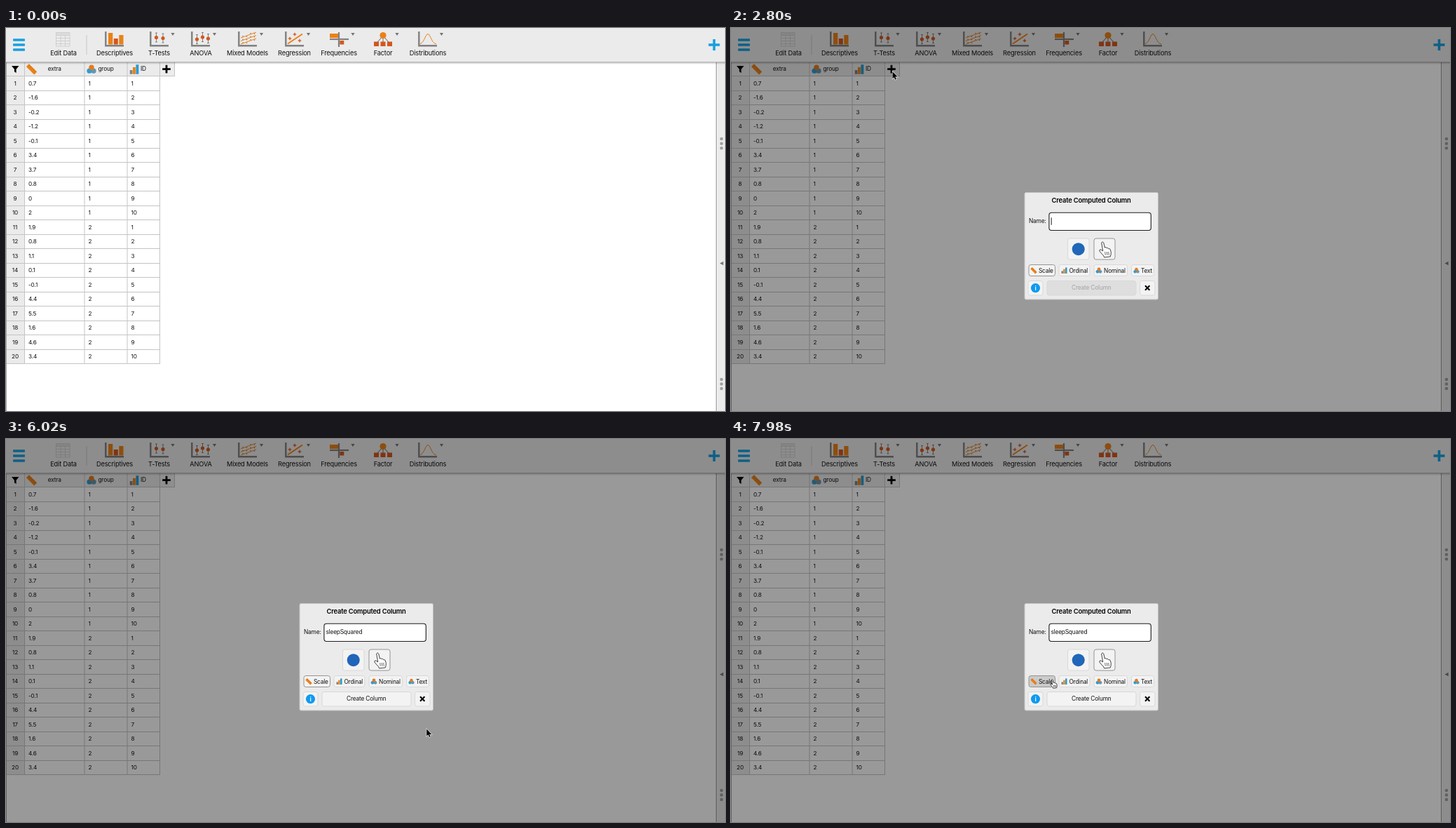
Write an HTML page with a canvas that moves like this. It is 1026 by 546 pixels and loops after 8000 ms.

```html
<!DOCTYPE html>
<html lang="en">
<head>
<meta charset="utf-8">
<title>Create a computed column</title>
<style>
html, body { margin: 0; width: 100%; height: 100%; overflow: hidden; background: #fff; }
canvas { display: block; width: 1026px; height: 546px; }
</style>
</head>
<body>
<canvas id="stage" width="1026" height="546"></canvas>
<script>
const ctx = document.getElementById('stage').getContext('2d');
const LOOP = 8000, STEP = 70;
const ORANGE = '#ea8117', RUST = '#d4561c', BLUE = '#18a0e0', GRAY = '#808080', PANEL = '#ebebeb';

const extra = '0.7 -1.6 -0.2 -1.2 -0.1 3.4 3.7 0.8 0 2 1.9 0.8 1.1 0.1 -0.1 4.4 5.5 1.6 4.6 3.4'.split(' ');

// Pointer path: time, x, y
const path = [
  [1470, 285, 336], [1540, 240, 225], [1610, 203, 130], [1680, 187, 91], [1820, 187, 91],
  [1890, 194.5, 90], [2100, 208, 84], [2380, 230.5, 62.2], [5530, 230.5, 62.2],
  [5810, 615, 436], [5950, 615, 436], [6230, 556, 346], [6300, 556, 346],
  [6510, 505, 319], [6580, 503.5, 316.5], [7140, 499, 313], [7350, 534, 317],
  [7560, 511, 344], [7770, 468, 350], [7980, 459, 342.5]
];

// Time at which each letter of the name is typed
const word = 'sleepSquared';
const keyTimes = [3080, 3780, 3920, 4060, 4200, 4550, 4760, 4970, 5040, 5110, 5250, 5390];

const buttons = {
  code: [480.5, 300, 30.5, 30], drag: [518, 300, 30, 30],
  scale: [425, 337.5, 37.5, 16], ordinal: [468, 337.5, 44, 16],
  nominal: [518, 337.5, 47.5, 16], text: [571.5, 337.5, 32, 16],
  info: [424, 360.5, 21, 20.5], create: [451, 360.5, 127, 20.5], close: [583.5, 360.5, 21.5, 20.5]
};

function rect(x, y, w, h, color) {
  ctx.fillStyle = color;
  ctx.fillRect(x, y, w, h);
}

function line(color, width, ...pts) {
  ctx.strokeStyle = color;
  ctx.lineWidth = width;
  ctx.beginPath();
  for (let i = 0; i < pts.length; i += 2) ctx.lineTo(pts[i], pts[i + 1]);
  ctx.stroke();
}

function shape(color, ...pts) {
  ctx.fillStyle = color;
  ctx.beginPath();
  for (let i = 0; i < pts.length; i += 2) ctx.lineTo(pts[i], pts[i + 1]);
  ctx.fill();
}

function dot(x, y, r, color) {
  ctx.fillStyle = color;
  ctx.beginPath();
  ctx.arc(x, y, r, 0, 7);
  ctx.fill();
}

function box(x, y, w, h, r, fill, stroke, width = 1) {
  ctx.beginPath();
  ctx.roundRect(x, y, w, h, r);
  ctx.fillStyle = fill;
  ctx.fill();
  ctx.strokeStyle = stroke;
  ctx.lineWidth = width;
  ctx.stroke();
}

function setFont(size, weight = 400) {
  ctx.font = `${weight} ${size}px Inter, Roboto, sans-serif`;
  ctx.letterSpacing = (-0.02 * size) + 'px';
}

function label(str, x, y, { size = 8.3, align = 'center', color = '#111', weight = 400 } = {}) {
  setFont(size, weight);
  ctx.textAlign = align;
  ctx.textBaseline = 'alphabetic';
  ctx.fillStyle = color;
  ctx.fillText(str, x, y + size * 0.36);
}

function plus(x, y, arm, width, color) {
  line(color, width, x - arm, y, x + arm, y);
  line(color, width, x, y - arm, x, y + arm);
}

const axes = x => line(GRAY, 2.4, x + 1.3, 5, x + 1.3, 25.3, x + 27, 25.3);

function errorBar(x, y) {
  line('#777', 0.9, x, y - 6.5, x, y + 6.5);
  line('#777', 0.9, x - 1.5, y - 6.5, x + 1.5, y - 6.5);
  line('#777', 0.9, x - 1.5, y + 6.5, x + 1.5, y + 6.5);
  dot(x, y, 2.6, RUST);
}

function scaleIcon(x, y, s) {
  ctx.save();
  ctx.translate(x, y);
  ctx.rotate(Math.PI / 4);
  ctx.scale(s, s);
  rect(-8, -2.8, 16, 5.6, ORANGE);
  for (let i = -6; i <= 6; i += 3) line('#b8651a', 0.7, i, -2.8, i, -0.6);
  ctx.restore();
}

function ordinalIcon(x, y, s) {
  rect(x - 6 * s, y + s, 3.6 * s, 5.5 * s, GRAY);
  rect(x - 1.9 * s, y - 3 * s, 3.7 * s, 9.5 * s, ORANGE);
  rect(x + 2.3 * s, y - 6.5 * s, 3.8 * s, 13 * s, '#2a9bd2');
}

function nominalIcon(x, y, s) {
  dot(x - 3 * s, y + 2.5 * s, 3.6 * s, '#2f9bcf');
  dot(x + 3 * s, y + 2.5 * s, 3.6 * s, '#6297b2');
  dot(x, y - 2.5 * s, 3.7 * s, '#e47b22');
}

function toolbarIcons() {
  for (const y of [17, 24, 31]) {
    ctx.beginPath();
    ctx.roundRect(10, y - 1.7, 17, 3.4, 1);
    ctx.fillStyle = BLUE;
    ctx.fill();
  }
  plus(1010.5, 24, 8, 3.6, BLUE);

  ctx.strokeStyle = '#cfcfcf';
  ctx.lineWidth = 1;
  ctx.strokeRect(71.5, 6.5, 19.5, 19.5);
  rect(72, 7, 19, 3, '#dcdcdc');
  for (let y = 10.5; y < 26; y += 4) line('#cfcfcf', 1, 71, y, 91, y);
  for (const x of [78, 84.5]) line('#cfcfcf', 1, x, 10, x, 26);
  line('#c6c6c6', 1, 115, 10, 115, 38);

  axes(141);
  rect(146, 7, 6.3, 16.5, ORANGE);
  rect(153.8, 15, 6, 8.5, RUST);
  rect(161.3, 10, 6.2, 13.5, ORANGE);

  axes(205);
  errorBar(214.5, 13.5);
  errorBar(224, 14.5);

  axes(264);
  errorBar(272.5, 16);
  errorBar(280.5, 13);
  errorBar(288.5, 15);

  axes(331);
  for (let i = 0; i < 3; i++) {
    const y = 14 + i * 4.5;
    line(ORANGE, 1, 335, y, 357, y - 8);
    for (let k = 0; k < 4; k++) dot(338 + k * 5.5, y - 1 - k * 2 + (k % 2 ? 1.2 : -1.2), 0.8, '#b06a38');
  }

  axes(398);
  line(ORANGE, 2, 402, 22.5, 423, 8.5);
  plus(405, 15, 2.3, 1.3, RUST);
  plus(412, 9, 2.3, 1.3, RUST);
  plus(419, 18, 2.3, 1.3, RUST);

  line(GRAY, 2.2, 475, 6, 475, 27);
  line(GRAY, 2.2, 462, 16, 489, 16);
  rect(462, 8, 12, 6, ORANGE);
  rect(476.3, 18, 6, 5.5, RUST);

  for (const x of [528.5, 538, 547.5]) {
    line('#777', 1.1, 538, 11, x, 22);
    rect(x - 3.5, 19.5, 7, 6.5, RUST);
  }
  dot(538, 10.5, 4.6, ORANGE);

  axes(588);
  ctx.strokeStyle = ORANGE;
  ctx.lineWidth = 1;
  ctx.beginPath();
  for (let x = 591; x <= 614; x++) ctx.lineTo(x, 23 - 14.5 * Math.exp(-(((x - 602) / 6) ** 2)));
  ctx.stroke();

  for (const x of [238, 297.5, 364.5, 431.5, 495, 558, 621.5]) shape('#737373', x - 2.6, 7, x + 2.6, 7, x, 11);

  const names = [['Edit Data', 82], ['Descriptives', 155], ['T-Tests', 218.5], ['ANOVA', 278],
    ['Mixed Models', 344.5], ['Regression', 411.5], ['Frequencies', 475], ['Factor', 538], ['Distributions', 602]];
  for (const [name, x] of names) label(name, x, 35.8, { size: 9.25 });
}

function table(pressed) {
  const grid = '#c4c4c4';
  rect(0, 49, 240.5, 20, PANEL);
  rect(0, 69, 27, 410, PANEL);
  rect(220, 49, 20.5, 20, pressed ? '#c9c9c9' : '#ededed');
  for (let i = 0; i <= 20; i++) {
    const y = 68.5 + Math.round(i * 20.5);
    line(grid, 1, 0, y, i ? 219.5 : 240.5, y);
  }
  for (const x of [26.5, 112, 173, 219.5]) line(grid, 1, x, 49, x, 479);
  line(grid, 1, 240.5, 49, 240.5, 69);
  line('#a8a8a8', 1, 0.5, 49, 0.5, 546);

  shape('#000', 8, 54, 18.5, 54, 14.6, 58.8, 14.6, 64, 11.9, 62.3, 11.9, 58.8);
  scaleIcon(36.5, 58.8, 1);
  nominalIcon(122, 58.7, 1);
  ordinalIcon(183, 59, 1.04);
  label('extra', 69.3, 58.5);
  label('group', 142.5, 58.5);
  label('ID', 196, 58.5);
  plus(229, 58.6, 5.8, 2.8, '#000');

  extra.forEach((value, i) => {
    const y = 79 + i * 20.5, size = 8.2;
    label(i + 1, 13, y, { size });
    label(value, 32, y, { size, align: 'left' });
    label(i < 10 ? 1 : 2, 117.5, y, { size, align: 'left' });
    label(i % 10 + 1, 178.5, y, { size, align: 'left' });
  });
}

function windowBase(pressed) {
  rect(0, 0, 1026, 546, '#fff');
  table(pressed);
  rect(1014, 49, 12, 497, PANEL);
  line('#9b9b9b', 1, 1013.5, 49, 1013.5, 546);
  for (const y of [158, 164.7, 171.3, 501, 507.5, 514]) dot(1021, y, 2.3, '#a0a0a0');
  shape('#777', 1018.5, 335.5, 1023.7, 332.7, 1023.7, 338.3);
  rect(0, 0, 1026, 48, PANEL);
  const shadow = ctx.createLinearGradient(0, 48, 0, 52);
  shadow.addColorStop(0, 'rgba(0,0,0,.32)');
  shadow.addColorStop(1, 'rgba(0,0,0,0)');
  rect(0, 48, 1026, 4, shadow);
  toolbarIcons();
}

function hand(x, y, s, fill, width) {
  ctx.save();
  ctx.translate(x, y);
  ctx.scale(s, s);
  const outline = new Path2D('M3.2 1.6Q4.6-1 6.2 1.5L7.8 8.6Q9.6 7.2 10.6 9.2Q12.4 8.2 13.2 10.2' +
    'Q15.4 9.6 15.8 11.6L16.8 15Q17 18 15.8 21.4L7.2 22.4Q6.2 19.4 3.6 17.4L.4 13.6Q0 11.2 2.2 11.4L5.2 13.4Z');
  ctx.lineJoin = 'round';
  ctx.fillStyle = fill;
  ctx.fill(outline);
  ctx.strokeStyle = '#111';
  ctx.lineWidth = width;
  ctx.stroke(outline);
  for (const k of [8.6, 11.2, 13.6]) line('#111', width * 0.8, k - 0.4, 14.5, k + 0.2, 19.3);
  ctx.restore();
}

function arrow(x, y) {
  ctx.save();
  ctx.translate(x, y);
  const outline = new Path2D('M0 0V10L2.3 8L3.8 11.5L5.4 10.9L3.9 7.4H7.2Z');
  ctx.strokeStyle = '#fff';
  ctx.lineWidth = 1.1;
  ctx.stroke(outline);
  ctx.fillStyle = '#000';
  ctx.fill(outline);
  ctx.restore();
}

function caretOn(t) {
  if (t < 3570) return true;
  if (t < 3780) return false;
  if (t < 5810) return true;
  return t >= 6230 && Math.floor((t - 6230) / 490) % 2 === 0;
}

function dialog(t, hover) {
  const ready = t >= 3570;
  box(419, 234.5, 190.5, 152.5, 2, PANEL, '#c2c2c2');
  label('Create Computed Column', 514, 246, { size: 9.4, weight: 600, color: '#000' });
  label('Name:', 425, 275.5, { align: 'left' });
  box(453.9, 263.3, 145.4, 25.2, 3.5, '#fff', '#1c1c1c', 1.1);

  const typed = word.slice(0, keyTimes.filter(k => k <= t).length);
  label(typed, 456.4, 275.5, { align: 'left' });
  if (caretOn(t)) {
    const x = 456.7 + (typed ? ctx.measureText(typed).width : 0);
    rect(x, 270.3, 0.9, 10.5, '#000');
  }

  for (const id in buttons) {
    const chosen = id === 'drag' || id === 'scale';
    let fill = '#f3f3f3';
    if (id === 'create' && !ready) fill = '#dedede';
    if (id === hover) fill = '#cbcbcb';
    box(...buttons[id], 3, fill, chosen || id === hover ? '#8c8c8c' : '#d6d6d6', 0.9);
  }

  dot(495.7, 315.2, 9, '#2166b8');
  hand(525.5, 304.5, 1, '#fff', 0.8);

  scaleIcon(432, 345.7, 0.62);
  ordinalIcon(475.5, 345.7, 0.66);
  nominalIcon(525, 345.7, 0.66);
  nominalIcon(578.5, 345.7, 0.62);
  label('Scale', 449.3, 345.6);
  label('Ordinal', 495.8, 345.6);
  label('Nominal', 547.5, 345.6);
  label('Text', 593, 345.6);

  dot(434.5, 370.6, 6.6, '#0d9af0');
  label('i', 434.5, 370.6, { size: 9, color: '#fff', weight: 600 });
  label('Create Column', 514.3, 370.4, { color: ready ? '#111' : '#a3a3a3' });
  line('#000', 2, 591, 367.3, 597.4, 373.7);
  line('#000', 2, 597.4, 367.3, 591, 373.7);
}

function pointerAt(t) {
  if (t < 1470 || (t >= 3080 && t < 5600)) return null;
  const i = path.findIndex(p => p[0] >= t);
  if (i < 1) return path[0].slice(1);
  const [t0, x0, y0] = path[i - 1], [t1, x1, y1] = path[i];
  const k = (t - t0) / (t1 - t0);
  return [x0 + (x1 - x0) * k, y0 + (y1 - y0) * k];
}

function buttonAt(p) {
  return p && Object.keys(buttons).find(id => {
    const [x, y, w, h] = buttons[id];
    return p[0] >= x && p[0] <= x + w && p[1] >= y && p[1] <= y + h;
  });
}

function draw(t) {
  const open = t >= 2800;
  const p = pointerAt(t);
  const hover = open && buttonAt(p);
  windowBase(t >= 2520 && !open);
  if (open) {
    rect(0, 0, 1026, 546, 'rgba(0,0,0,.4)');
    dialog(t, hover);
  }
  if (!p) return;
  if (hover) hand(p[0] - 3.4, p[1], 0.57, '#fff', 1.4);
  else arrow(...p);
}

let start = null, last = -1;
function tick(now) {
  if (start === null) start = now;
  const t = Math.floor(((now - start) % LOOP) / STEP) * STEP;
  if (t !== last) draw(last = t);
  requestAnimationFrame(tick);
}
draw(0);
requestAnimationFrame(tick);
</script>
</body>
</html>
```
